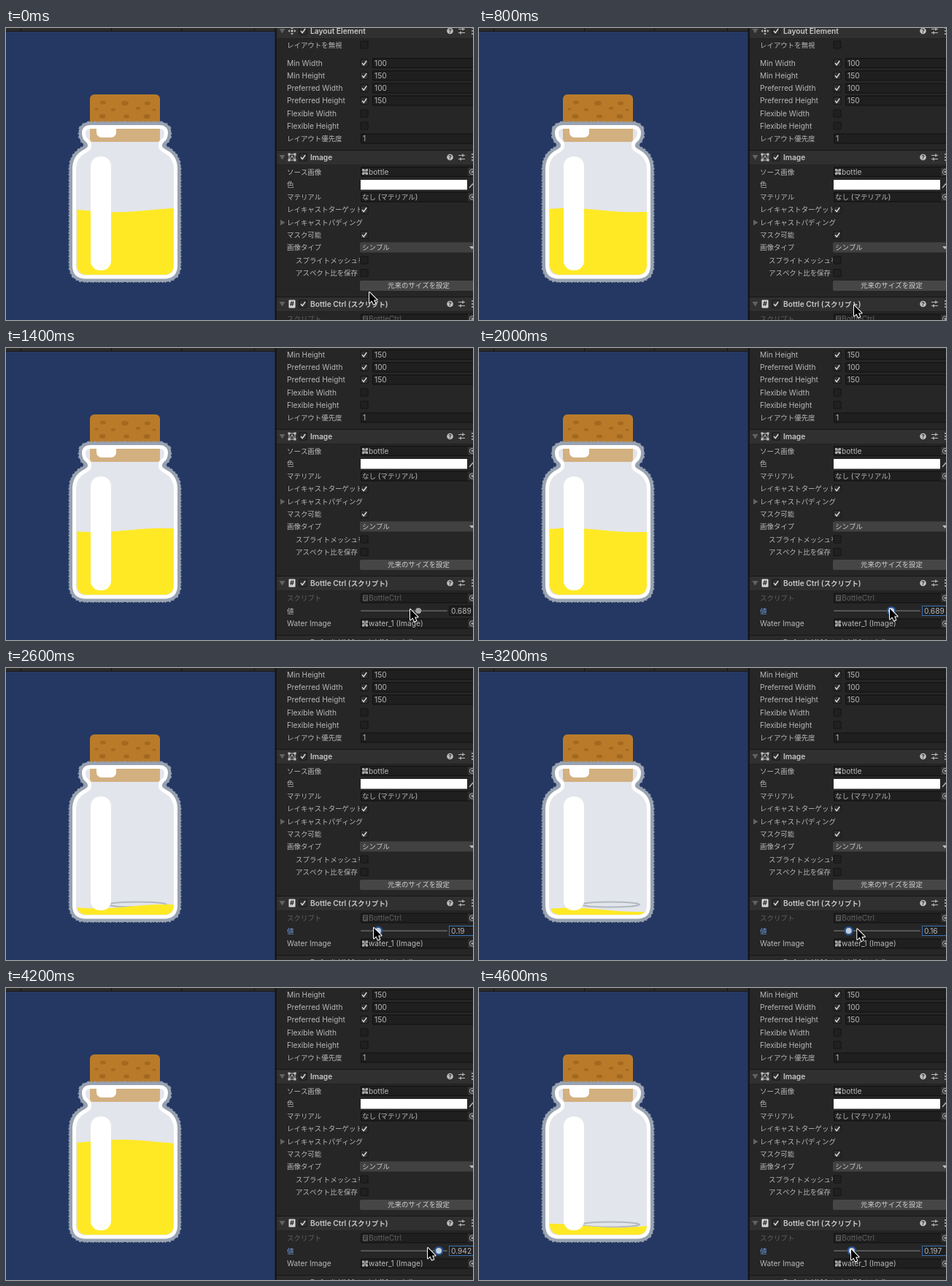
These frames come from a looping animation (640 px wide and 400 px high, 4.8 s). An HTML page with a canvas:

```html
<!DOCTYPE html>
<html lang="ja">
<head>
<meta charset="utf-8">
<style>
html, body { margin: 0; width: 100%; height: 100%; overflow: hidden; background: #262626; }
canvas { display: block; }
</style>
</head>
<body>
<canvas width="640" height="400"></canvas>
<script>
const ctx = document.querySelector('canvas').getContext('2d');
const LOOP = 4800, STEP = 200, SCROLL_AT = 1000, FOCUS_AT = 2000;
const INK = '#b8b8b8', FIELD = '#1f1f1f';

// Keys: [time, value] and [time, x, y]
const valueKeys = [[0, .689], [2000, .689], [2200, .58], [2400, .37], [2600, .19], [2800, .08],
  [3000, .06], [3200, .16], [3400, .33], [3600, .499], [4000, .86], [4200, .942], [4400, .56], [4600, .197]];
const cursorKeys = [[0, 498, 362], [200, 498, 362], [800, 514, 380], [1000, 528, 374], [1400, 554, 358],
  [1800, 565, 357], [2000, 563, 357], [2600, 504, 356], [2900, 496, 357], [3600, 548, 358],
  [4000, 588, 357], [4200, 578, 356], [4400, 536, 357], [4600, 510, 358]];

function at(keys, t) {
  const i = keys.findIndex(k => k[0] > t);
  if (i < 0) return keys.at(-1).slice(1);
  const a = keys[i - 1], b = keys[i], u = (t - a[0]) / (b[0] - a[0]);
  return a.slice(1).map((v, j) => v + (b[j + 1] - v) * u);
}

function rect(x, y, w, h, color, r = 0) {
  ctx.fillStyle = color;
  ctx.beginPath();
  ctx.roundRect(x, y, w, h, r);
  ctx.fill();
}

function line(color, width, ...points) {
  ctx.strokeStyle = color;
  ctx.lineWidth = width;
  ctx.beginPath();
  points.forEach(([x, y]) => ctx.lineTo(x, y));
  ctx.stroke();
}

function poly(color, ...points) {
  ctx.fillStyle = color;
  ctx.beginPath();
  points.forEach(([x, y]) => ctx.lineTo(x, y));
  ctx.fill();
}

function disc(x, y, rx, color, ry = rx) {
  ctx.fillStyle = color;
  ctx.beginPath();
  ctx.ellipse(x, y, rx, ry, 0, 0, 7);
  ctx.fill();
}

function ring(x, y, r, color) {
  ctx.strokeStyle = color;
  ctx.lineWidth = 1;
  ctx.beginPath();
  ctx.arc(x, y, r, 0, 7);
  ctx.stroke();
}

// Latin and Japanese runs have slightly different sizes.
function text(s, x, y, color = INK, weight = 400) {
  ctx.fillStyle = color;
  for (const run of s.match(/[\x20-\x7e]+|[^\x20-\x7e]+/g)) {
    const latin = run < '\x7f';
    ctx.font = `${weight} ${latin ? 10.2 : 9.45}px Inter, "Noto Sans CJK JP", "Noto Sans CJK", sans-serif`;
    ctx.fillText(run, x, y + 3.7);
    x += ctx.measureText(run).width;
  }
}

function check(x, y, on) {
  rect(x, y - 5.5, 11, 11, '#111', 2);
  rect(x + .8, y - 4.7, 9.4, 9.4, on ? '#303030' : '#202020', 1.5);
  if (on) line('#e0e0e0', 1.4, [x + 2.5, y], [x + 4.7, y + 2.7], [x + 8.7, y - 3]);
}

function field(x, y, value) {
  rect(x, y - 7, 160, 14, '#111', 2);
  rect(x + 1, y - 6, 160, 12, FIELD, 2);
  text(value, x + 3, y);
}

function script(x, y, s, color) {
  rect(x, y - s * .6, s, s * 1.2, color, 1);
  ctx.font = `700 ${s}px Inter, sans-serif`;
  ctx.fillStyle = '#222';
  ctx.fillText('#', x + s * .18, y + s * .37);
}

function imageIcon(x, y, s, color) {
  ctx.strokeStyle = color;
  ctx.lineWidth = 1;
  ctx.strokeRect(x + 1.5, y - s / 2 + 1.5, s - 3, s - 3);
  for (const i of [0, s - 3]) for (const j of [0, s - 3]) rect(x + i, y - s / 2 + j, 3, 3, color);
  line(color, 1, [x + 3, y + s / 4], [x + s / 2, y - s / 5], [x + s - 3, y + s / 4]);
}

function layoutIcon(x, y) {
  disc(x, y, 1.7, '#bbb');
  for (let a = 0; a < 4; a++) {
    const c = Math.cos(a * Math.PI / 2), s = Math.sin(a * Math.PI / 2);
    poly('#bbb', [x + 5.5 * c, y + 5.5 * s], [x + 3 * c - 2 * s, y + 3 * s + 2 * c], [x + 3 * c + 2 * s, y + 3 * s - 2 * c]);
  }
}

function objectField(y, label, icon, dim) {
  field(486, y, ' ');
  if (icon === 'image') imageIcon(488, y, 8, '#aaa');
  if (icon === 'script') script(489, y, 7, '#555');
  text(label, icon ? 497 : 488, y, dim ? '#606060' : INK);
  rect(633, y - 6, 7, 12, '#303030');
  ring(639, y, 3.7, '#aaa');
  disc(639, y, 1.4, '#aaa');
}

function header(y, title, icon) {
  rect(371, y - 10, 269, 20, '#303030');
  rect(371, y - 10, 269, 1, '#161616');
  rect(371, y + 10, 269, 1, '#222');
  poly('#626262', [374.5, y - 3], [382.5, y - 3], [378.5, y + 3.5]);
  icon();
  check(401.5, y, true);
  text(title, 417, y, '#c8c8c8', 600);
  disc(608.5, y, 4.3, '#c0c0c0');
  ctx.font = '700 8px Inter, sans-serif';
  ctx.fillStyle = '#303030';
  ctx.fillText('?', 606.3, y + 2.9);
  line('#bbb', 1, [620, y - 2.5], [629, y - 2.5]);
  line('#bbb', 1, [620, y + 2.5], [629, y + 2.5]);
  line('#bbb', 1.4, [626, y - 4.5], [626, y - .5]);
  line('#bbb', 1.4, [623, y + .5], [623, y + 4.5]);
  for (const d of [-4, 0, 4]) disc(639, y + d, 1, '#bbb');
}

function label(s, x, y, color) {
  ctx.save();
  ctx.beginPath();
  ctx.rect(371, y - 10, s.includes('パディング') ? 130 : 114, 20);
  ctx.clip();
  text(s, x, y, color);
  ctx.restore();
}

function slider(y, value, focused) {
  const x = 489 + 110.5 * value;
  label('値', 385, y, focused ? '#6f9fe8' : INK);
  rect(486, y - 1, 119, 2, '#565656', 1);
  if (focused) disc(x, y, 6.3, '#26528c');
  disc(x, y, 4, focused ? '#c4cede' : '#a0a0a0');
  field(607, y, String(+value.toFixed(3)));
  if (focused) {
    ctx.strokeStyle = '#3a72b8';
    ctx.lineWidth = 1;
    ctx.strokeRect(607.5, y - 6.5, 40, 13);
  }
}

function inspector(value, focused, scroll) {
  ctx.save();
  rect(369, 0, 271, 400, '#262626');
  ctx.translate(0, -scroll);

  header(4, 'Layout Element', () => layoutIcon(392, 4));
  label('レイアウトを無視', 385, 23);
  check(485.5, 23, false);
  ['Min Width', 'Min Height', 'Preferred Width', 'Preferred Height'].forEach((name, i) => {
    const y = 48 + 17.2 * i;
    label(name, 385, y);
    check(485.5, y, true);
    field(502, y, i % 2 ? '150' : '100');
  });
  [['Flexible Width', 117], ['Flexible Height', 134]].forEach(([name, y]) => {
    label(name, 385, y);
    check(485.5, y, false);
  });
  label('レイアウト優先度', 385, 151.5);
  field(486, 151.5, '1');

  header(177, 'Image', () => imageIcon(386.5, 177, 11, '#c4c4c4'));
  label('ソース画像', 385, 197);
  objectField(197, 'bottle', 'image');
  label('色', 385, 214.5);
  rect(486, 208, 146, 13.5, '#fff');
  line('#aaa', 1.6, [635, 219], [640, 213]);
  label('マテリアル', 385, 231.5);
  objectField(231.5, 'なし (マテリアル)');
  label('レイキャストターゲット', 385, 248.5);
  check(485.5, 249, true);
  poly('#626262', [376, 262.5], [382.5, 266.5], [376, 270.5]);
  label('レイキャストパディング', 385, 266.5);
  label('マスク可能', 385, 283.5);
  check(485.5, 283.5, true);
  label('画像タイプ', 385, 300.5);
  rect(485, 293.5, 160, 14, '#414141', 2);
  text('シンプル', 488, 300.5, '#ccc');
  poly('#bbb', [635, 299], [642, 299], [638.5, 303]);
  label('スプライトメッシュを', 397, 318);
  check(485.5, 318, false);
  label('アスペクト比を保存', 397, 335);
  check(485.5, 335.5, false);
  rect(485, 346, 160, 14, '#464646', 2);
  text('元来のサイズを設定', 523, 352.5, '#d0d0d0');

  header(378, 'Bottle Ctrl (スクリプト)', () => script(387.5, 378, 9, '#d6d6d6'));
  label('スクリプト', 385, 398.5, '#606060');
  objectField(398.5, 'BottleCtrl', 'script', true);
  slider(416, value, focused);
  label('Water Image', 385, 433.5);
  objectField(433.5, 'water_1 (Image)', 'image');
  rect(371, 449, 269, 20, '#2a2a2a');
  rect(371, 449, 269, 1, '#161616');
  text('Default UI Material (Material)', 417, 459, '#999', 600);
  ctx.restore();
  rect(368.5, 0, 2.5, 400, '#161616');
}

const half = new Path2D('M163 135.5H115Q107 136 106.5 143Q106.5 151 111 154Q116 158 114 164Q112 167 106 170Q94 177 93.5 192V326Q94 341 109 341H163');
const outline = new Path2D(half);
outline.addPath(half, new DOMMatrix([-1, 0, 0, 1, 326, 0]));

function cork() {
  rect(115, 91, 96, 50, '#b97b2a', 6);
  for (const [x, y, r] of [[133, 102, 4], [163, 103, 5], [194, 103, 4], [124, 111, 2.5], [147, 112, 3],
    [181, 110, 3], [203, 112, 2.5], [132, 121, 4.5], [165, 121, 4], [193, 121, 4.5]])
    disc(x, y, r, '#a3691f', r * .65);
}

function water(t, value) {
  const level = 356 - 154.5 * value, dip = 150 - .148 * t;
  ctx.save();
  ctx.beginPath();
  ctx.roundRect(97, 150, 133.5, 188, [0, 0, 13, 13]);
  ctx.clip();
  ctx.fillStyle = '#ffe925';
  ctx.beginPath();
  ctx.moveTo(97, 340);
  for (let x = 97; x <= 231; x += 2) ctx.lineTo(x, level + 2.7 * Math.cos((x - dip) * Math.PI / 90));
  ctx.lineTo(231, 340);
  ctx.fill();
  ctx.restore();
}

function bottle(t, value) {
  cork();
  ctx.strokeStyle = '#98a2b1';
  ctx.lineWidth = 14;
  ctx.stroke(outline);
  // Broken second stroke roughens the chalky edge.
  ctx.lineWidth = 16;
  ctx.setLineDash([2, 3, 1, 2]);
  ctx.stroke(outline);
  ctx.setLineDash([]);
  ctx.fillStyle = '#e2e5eb';
  ctx.fill(outline);
  rect(115, 137.5, 96, 18.5, '#d3b07f', [0, 0, 4, 4]);
  ctx.strokeStyle = '#b3b8c0';
  ctx.lineWidth = 2;
  ctx.beginPath();
  ctx.ellipse(180, 324, 40, 3.5, 0, 0, 7);
  ctx.stroke();
  water(t, value);
  ctx.strokeStyle = '#fff';
  ctx.lineWidth = 5;
  ctx.stroke(outline);
  rect(124, 135, 27, 15, '#fff', [2, 2, 7, 7]);
  rect(116, 176, 28, 156, '#fff', 13);
}

function cursor(x, y) {
  const shape = new Path2D('M0 0V14.5L3.4 11.4L5.7 16.6L8.3 15.5L6 10.5H10.5Z');
  ctx.save();
  ctx.translate(x, y);
  ctx.strokeStyle = '#fff';
  ctx.lineWidth = 2;
  ctx.lineJoin = 'round';
  ctx.stroke(shape);
  ctx.fillStyle = '#000';
  ctx.fill(shape);
  ctx.restore();
}

function draw(t) {
  const [value] = at(valueKeys, t);
  rect(0, 0, 369, 400, '#243863');
  rect(0, 0, 369, 4, '#2b2b2b');
  rect(0, 4, 369, 1, '#191919');
  for (const x of [20, 144, 240, 340]) rect(x, 0, 1, 4, '#151515');
  bottle(t, value);
  inspector(value, t >= FOCUS_AT, t >= SCROLL_AT ? 56 : 0);
  cursor(...at(cursorKeys, t));
}

const start = performance.now();
function frame() {
  const t = (performance.now() - start) % LOOP;
  draw(Math.floor(t / STEP) * STEP);
  requestAnimationFrame(frame);
}
frame();
</script>
</body>
</html>
```
